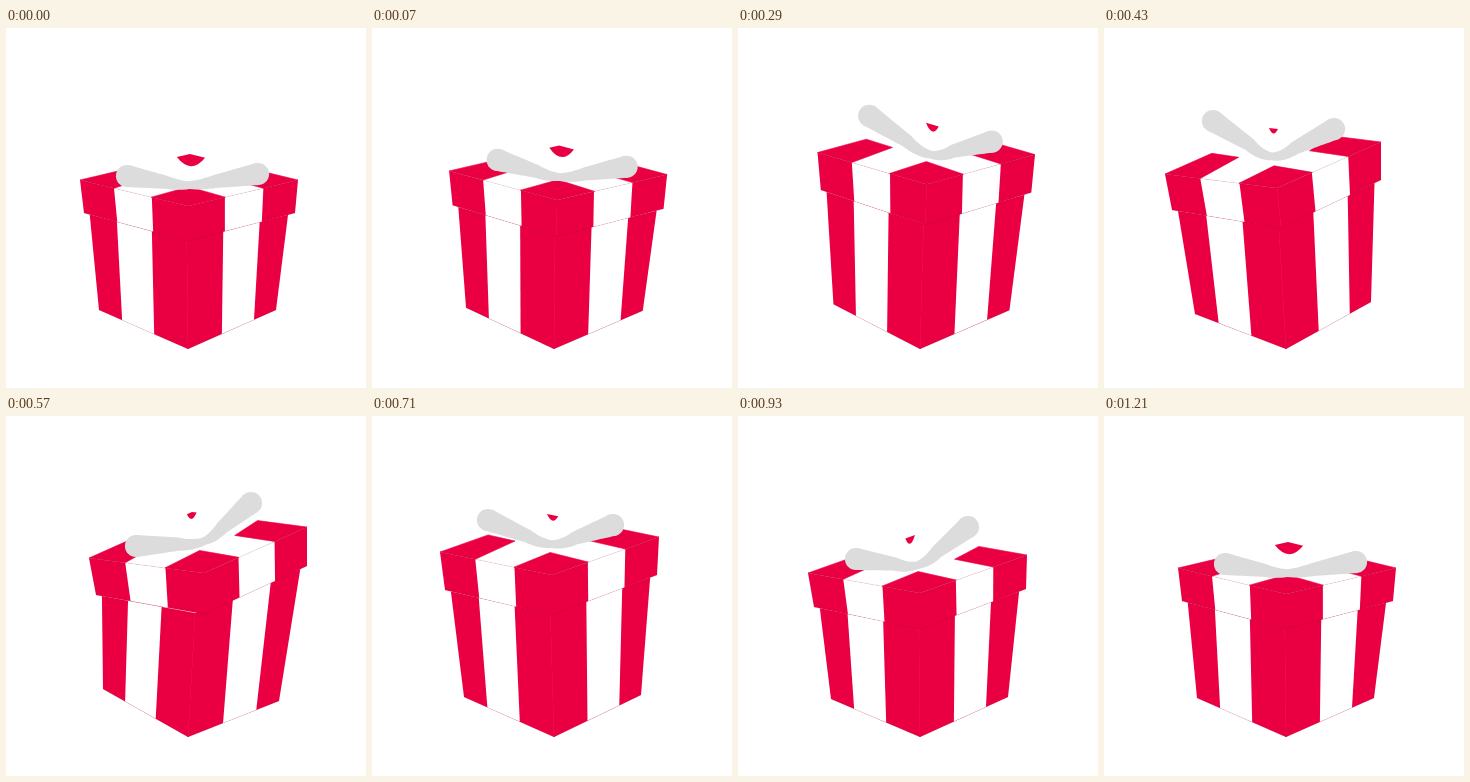
Write an HTML page with a canvas that moves like this. It is 360 px wide and 360 px high and loops after 2370 ms.

```html
<!DOCTYPE html>
<html lang="en">
<head>
<meta charset="utf-8">
<title>Wobbling gift</title>
<style>
html, body { margin: 0; width: 100%; height: 100%; overflow: hidden; background: #fff; }
canvas { display: block; width: 360px; height: 360px; }
</style>
</head>
<body>
<canvas id="stage"></canvas>
<script>
const RED = '#ea0042', WHITE = '#fff', GREY = '#dcdcdc', SEAM = '#ececec';
const LOOP = 2370, FPS = 14, STEPS = 17;
const FOOT = [182, 321];

// lid: top left, front, right; hem: lower lid edge; base: lower corners;
// bow: left end, knot, right end; chip: visible part of the back corner (left, right, depth)
const rest = {
  lid: [74, 152, 182, 178, 292, 152], hem: [78, 185, 182, 213, 289, 185],
  base: [93, 282, 270, 282], bow: [121, 148, 183, 158, 252, 146], chip: [.12, .14, 12]
};
const hop = {
  lid: [86, 117, 194, 155, 304, 131], hem: [88, 155, 191, 196, 299, 169],
  base: [97, 273, 273, 285], bow: [139, 86, 201, 128, 262, 118], chip: [0, .13, 10]
};
const left = {
  lid: [61, 146, 173, 160, 277, 114], hem: [68, 182, 177, 200, 277, 152],
  base: [91, 286, 267, 274], bow: [109, 93, 168, 131, 230, 101], chip: [0, .08, 6]
};
const right = {
  lid: [83, 142, 198, 157, 301, 111], hem: [90, 179, 198, 198, 301, 150],
  base: [97, 273, 273, 285], bow: [130, 130, 198, 127, 245, 87], chip: [.05, .04, 7]
};
const back = {
  lid: [68, 136, 180, 159, 287, 121], hem: [73, 174, 180, 199, 285, 159],
  base: [92, 281, 269, 279], bow: [116, 104, 180, 130, 241, 109], chip: [0, .1, 7]
};
const settle = {
  lid: [70, 157, 182, 177, 289, 139], hem: [76, 191, 182, 213, 288, 173],
  base: [93, 283, 270, 281], bow: [118, 143, 180, 151, 230, 111], chip: [.09, 0, 9]
};

const blend = (a, b, k) => Object.fromEntries(Object.keys(a).map(
  part => [part, a[part].map((v, i) => v + (b[part][i] - v) * k)]));
const farLeft = blend(blend(right, back, 1.55), left, .25);

// [step, pose]
const track = [[0, rest], [3, hop], [6, left], [8, right], [10, back],
  [11, farLeft], [13, settle], [STEPS, rest]];

const canvas = document.getElementById('stage');
const ctx = canvas.getContext('2d');
const scale = window.devicePixelRatio || 1;
canvas.width = canvas.height = 360 * scale;
ctx.scale(scale, scale);

const mix = (a, b, k) => [a[0] + (b[0] - a[0]) * k, a[1] + (b[1] - a[1]) * k];
const pairs = list => list.reduce((out, v, i) => (i % 2 ? out[out.length - 1].push(v) : out.push([v]), out), []);
// point reached from o by u towards a and v towards b
const at = (o, a, b, u, v) => [0, 1].map(i => o[i] + u * (a[i] - o[i]) + v * (b[i] - o[i]));

function trace(points) {
  ctx.beginPath();
  points.forEach(p => ctx.lineTo(p[0], p[1]));
}
function fill(points, color) {
  trace(points);
  ctx.closePath();
  ctx.fillStyle = color;
  ctx.fill();
}
// barely darkens what lies below
function seam(...points) {
  trace(points);
  ctx.globalCompositeOperation = 'multiply';
  ctx.strokeStyle = SEAM;
  ctx.lineWidth = 1;
  ctx.stroke();
  ctx.globalCompositeOperation = 'source-over';
}
function side(a, b, c, d, top, low) {
  fill([a, b, c, d], RED);
  fill([mix(a, b, top[0]), mix(a, b, top[1]), mix(d, c, low[1]), mix(d, c, low[0])], WHITE);
}
// red patch of the lid's top, closed over the join with its neighbours
function patch(points) {
  fill(points, RED);
  ctx.strokeStyle = RED;
  ctx.lineWidth = .6;
  ctx.stroke();
}

function drawBody(p) {
  const [hl, hf, hr] = pairs(p.hem);
  const [bl, br] = pairs(p.base);
  const tl = mix(hl, hf, .055), tr = mix(hr, hf, .065);
  const tf = [FOOT[0] + 2.4 * ((bl[0] + br[0]) / 2 - FOOT[0]), hf[1] - 1];
  side(tl, tf, FOOT, bl, [.28, .64], [.26, .62]);
  side(tf, tr, br, FOOT, [.36, .72], [.385, .75]);
  patch([tf, FOOT]);
  seam(bl, FOOT, br);
}

function drawLid(p) {
  const [l, f, r] = pairs(p.lid);
  const [hl, hf, hr] = pairs(p.hem);
  const b = [l[0] + r[0] - f[0], l[1] + r[1] - f[1]];
  side(l, f, hf, hl, [.315, .665], [.32, .665]);
  side(f, r, hr, hf, [.335, .685], [.345, .69]);
  fill([l, f, r, b], WHITE);
  patch([l, at(l, f, b, .315, 0), at(l, f, b, .25, .44), at(l, f, b, 0, .45)]);
  patch([r, at(r, f, b, .315, 0), at(r, f, b, .3, .36), at(r, f, b, 0, .43)]);
  patch([f, at(f, l, r, .34, 0), at(f, l, r, .37, .37), at(f, l, r, 0, .34)]);
  patch([f, hf]);
  seam(l, f, r);
  seam(hl, hf, hr);

  const [u, v, depth] = p.chip;
  const from = mix(b, l, u), to = mix(b, r, v);
  trace([from, b, to]);
  ctx.quadraticCurveTo((from[0] + to[0]) / 2, b[1] + depth * 1.75, from[0], from[1]);
  ctx.fillStyle = RED;
  ctx.fill();
}

// tapered band: straight towards the knot, rounded where it dips
function drawBow(p) {
  const [a, k, c] = pairs(p.bow);
  const m = mix(a, k, .62), n = mix(c, k, .62);
  const low = [2 * k[0] - (m[0] + n[0]) / 2, 2 * k[1] - (m[1] + n[1]) / 2];
  const bend = mix(k, low, .6);
  const spine = [];
  const N = 16;
  for (let i = 0; i < N; i++) spine.push(mix(a, m, i / N));
  for (let i = 0; i <= N; i++) spine.push(mix(mix(m, bend, i / N), mix(bend, n, i / N), i / N));
  for (let i = 1; i <= N; i++) spine.push(mix(n, c, i / N));
  const last = spine.length - 1;
  const upper = [], lower = [];
  spine.forEach((q, i) => {
    const s = spine[Math.max(i - 1, 0)], e = spine[Math.min(i + 1, last)];
    const dx = e[0] - s[0], dy = e[1] - s[1], len = Math.hypot(dx, dy) || 1;
    const reach = Math.min(1, Math.abs(q[0] - k[0]) / Math.abs((q[0] < k[0] ? a : c)[0] - k[0]));
    const w = 3.9 + 7.2 * reach;
    upper.push([q[0] + dy / len * w, q[1] - dx / len * w]);
    lower.unshift([q[0] - dy / len * w, q[1] + dx / len * w]);
  });
  fill([...upper, ...lower], GREY);
  for (const end of [a, c]) {
    ctx.beginPath();
    ctx.arc(end[0], end[1], 11.1, 0, Math.PI * 2);
    ctx.fill();
  }
}

// steps start at the nearest hundredth of a second
const startOf = step => Math.round(step * 100 / FPS) * 10;

function poseAt(ms) {
  let step = 0;
  while (step < STEPS && ms >= startOf(step + 1)) step++;
  const i = Math.max(1, track.findIndex(key => key[0] >= step));
  const [s0, p0] = track[i - 1], [s1, p1] = track[i];
  const k = (step - s0) / (s1 - s0);
  return blend(p0, p1, k * k * (3 - 2 * k));
}

function frame() {
  const pose = poseAt(performance.now() % LOOP);
  ctx.fillStyle = WHITE;
  ctx.fillRect(0, 0, 360, 360);
  drawBody(pose);
  drawLid(pose);
  drawBow(pose);
  requestAnimationFrame(frame);
}
frame();
</script>
</body>
</html>
```
